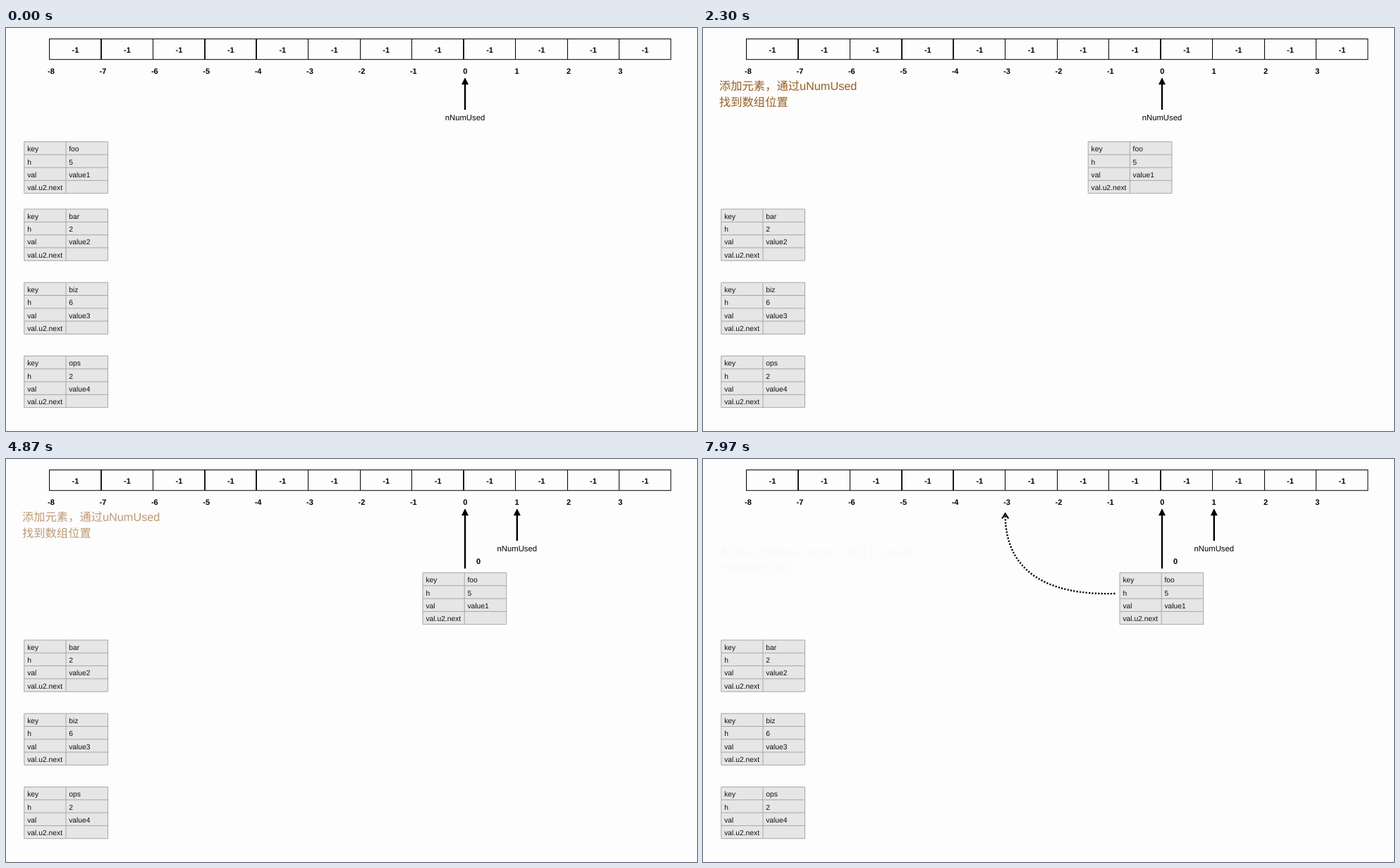
An HTML page that plays this animation: 980x572 px, repeating every 8000 ms.

```html
<!DOCTYPE html>
<html lang="zh-CN">
<head>
<meta charset="utf-8">
<title>Hash table insert</title>
<style>
  html, body { margin: 0; width: 100%; height: 100%; overflow: hidden; background: #fdfdfd; }
  svg { display: block; width: 980px; height: 572px; }
  text { font-family: "Liberation Sans", Arial, "Noto Sans CJK SC", "Noto Sans CJK", sans-serif;
         text-rendering: geometricPrecision; white-space: pre; }
  .num { font-size: 11px; font-weight: bold; text-anchor: middle; }
  .name { font-size: 11.3px; text-anchor: middle; }
  .cell { font-size: 10.3px; fill: #111; }
  .note { font-size: 16.3px; fill: #975f22; }
</style>
</head>
<body>
<svg id="stage" viewBox="0 0 980 572"></svg>
<script>
const LOOP = 8000;
const stage = document.getElementById('stage');

function add(parent, tag, attrs = {}, content) {
  const node = document.createElementNS('http://www.w3.org/2000/svg', tag);
  for (const key in attrs) node.setAttribute(key, attrs[key]);
  if (content !== undefined) node.textContent = content;
  return parent.appendChild(node);
}
const group = () => add(stage, 'g');
const label = (parent, cls, x, y, content) => add(parent, 'text', { class: cls, x, y }, content);
const stroke = (parent, d, color, width, extra = {}) =>
  add(parent, 'path', { d, fill: 'none', stroke: color, 'stroke-width': width, ...extra });

function drawArray() {
  const left = 61.5, step = 73.45, count = 12, heavy = [1, 3, 4, 8];
  add(stage, 'rect', { x: left, y: 15.5, width: step * count, height: 29.2,
                       fill: 'none', stroke: '#000', 'stroke-width': 1 });
  for (let i = 0; i < count; i++) {
    const x = left + step * i;
    if (i) {
      const wide = heavy.includes(i);
      const snapped = wide ? Math.round(x) : Math.floor(x) + 0.5;
      stroke(stage, `M${snapped} 15.5V44.7`, '#000', wide ? 1.8 : 1);
    }
    label(stage, 'num', x + 37, 34.6, '-1');
    label(stage, 'num', 64 + 73.4 * i, 65, i - 8);
  }
}

function drawBucket(top, key, hash, value) {
  const g = group(), left = 25.8, mid = 85, right = 144.5, row = 18.3;
  add(g, 'rect', { x: left, y: top, width: right - left, height: row * 4, fill: '#e6e6e6' });
  let grid = '';
  for (let i = 0; i <= 4; i++) grid += `M${left} ${top + row * i}H${right}`;
  for (const x of [left, mid, right]) grid += `M${x} ${top}v${row * 4}`;
  stroke(g, grid, '#a5a6ae', 1);
  [['key', key], ['h', hash], ['val', value], ['val.u2.next', '']].forEach(([name, content], i) => {
    const y = top + 13.7 + row * i;
    label(g, 'cell', 30.2, y, name);
    label(g, 'cell', 89.2, y, content);
  });
  return g;
}

function drawArrow(parent, x, bottom) {
  stroke(parent, `M${x} ${bottom}V79`, '#000', 2.4);
  add(parent, 'path', { d: `M${x} 70.3l5 10h-10z` });
}

function drawNote(x, y, lines) {
  const g = group();
  lines.forEach((line, i) => label(g, 'note', x, y + 23 * i, line));
  return g;
}

drawArray();
const foo = drawBucket(161.5, 'foo', 5, 'value1');
drawBucket(257, 'bar', 2, 'value2');
drawBucket(361.2, 'biz', 6, 'value3');
drawBucket(465.5, 'ops', 2, 'value4');

const pointer = group();
drawArrow(pointer, 651, 116);
label(pointer, 'name', 651, 131, 'nNumUsed');

const slot = group();
drawArrow(slot, 651, 155.5);
label(slot, 'num', 670, 149, '0');

const mapping = group();
stroke(mapping, 'M584.5 191C486 194 429 158 428.7 80', '#000', 2.4, { 'stroke-dasharray': '2.2 2.2' });
stroke(mapping, 'M424.2 84.5L428.7 77.5L433.2 84.5', '#000', 2.2);

const addNote = drawNote(23, 87.7, ['添加元素，通过uNumUsed', '找到数组位置']);
const hashNote = drawNote(19, 137.7, ['通过key计算hash code，通过 h | mask', '计算映射区索引']);

// Each step: [element, kind, start ms, length ms, amount]
const steps = [
  [addNote, 'fadeIn', 500, 1000],
  [foo, 'slide', 1500, 1000, 565.2],
  [pointer, 'slide', 3000, 1000, 73.8],
  [slot, 'fadeIn', 4000, 0],
  [addNote, 'fadeOut', 4500, 1000],
  [hashNote, 'fadeIn', 5500, 1000],
  [mapping, 'fadeIn', 6500, 0],
  [hashNote, 'fadeOut', 7000, 1000],
];
const ease = u => u < 0.5 ? 2 * u * u : 1 - 2 * (1 - u) ** 2;

function render(time) {
  const opacity = new Map();
  for (const [node, kind, start, length, amount] of steps) {
    const u = length ? Math.min(1, Math.max(0, (time - start) / length)) : +(time >= start);
    if (kind === 'slide') node.setAttribute('transform', `translate(${ease(u) * amount} 0)`);
    else if (kind === 'fadeIn') opacity.set(node, u);
    else opacity.set(node, opacity.get(node) * (1 - u));
  }
  opacity.forEach((value, node) => node.setAttribute('opacity', value));
}

const begin = performance.now();
function tick() {
  render((performance.now() - begin) % LOOP);
  requestAnimationFrame(tick);
}
tick();
</script>
</body>
</html>
```
